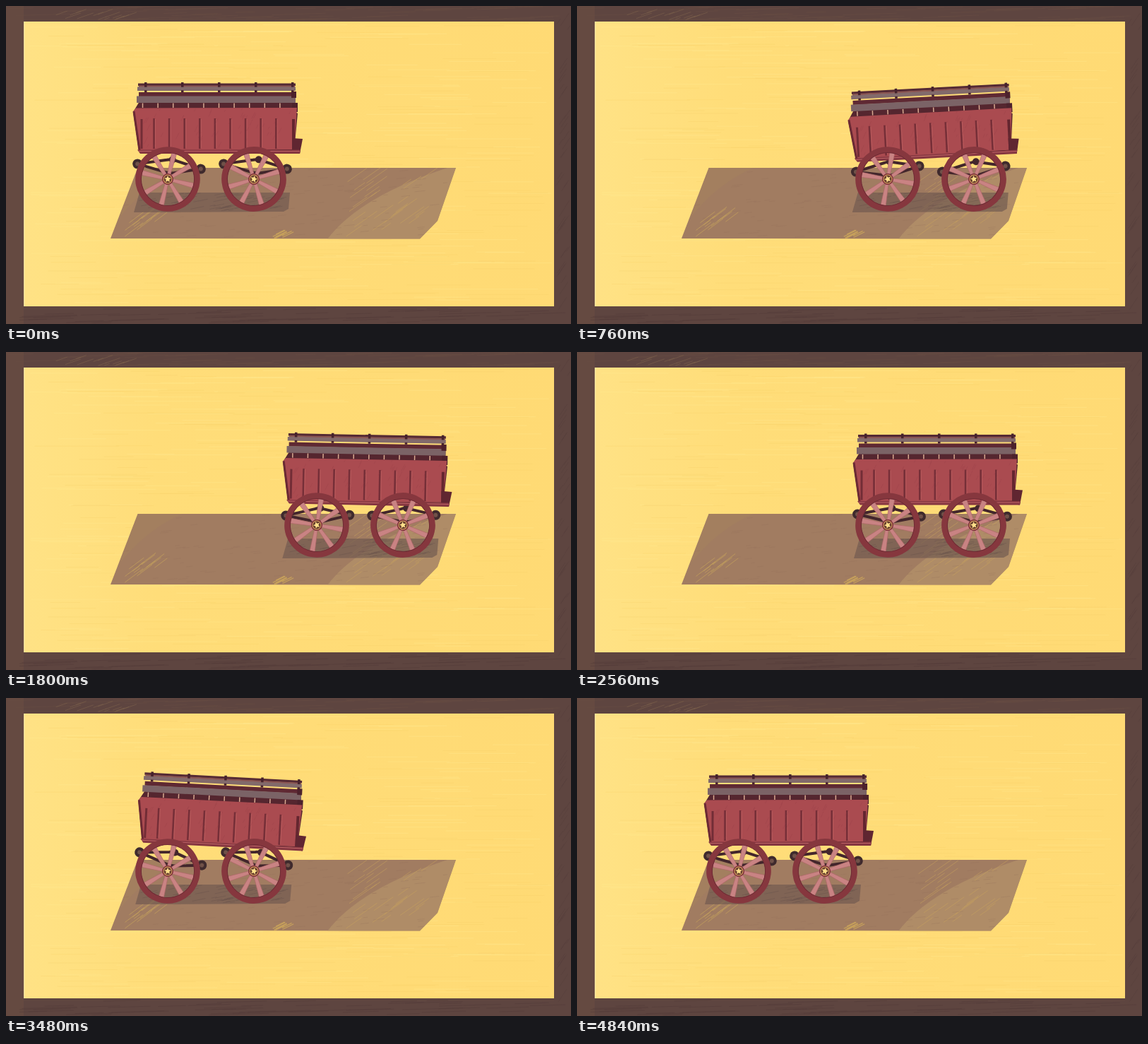
Recreate the animation shown at these times as an HTML page. Size 800 by 450 pixels, loop 4880 ms.

```html
<!DOCTYPE html>
<html lang="en">
<head>
<meta charset="utf-8">
<title>Wagon</title>
<style>
html, body { margin: 0; width: 100%; height: 100%; overflow: hidden; background: #5e4540; }
svg { display: block; width: 100vw; height: 100vh; }
</style>
</head>
<body>
<svg id="stage" viewBox="0 0 800 450" preserveAspectRatio="none">
  <defs>
    <linearGradient id="sun">
      <stop offset="0" stop-color="#ffe285"/>
      <stop offset=".25" stop-color="#ffdd79"/>
      <stop offset="1" stop-color="#ffda74"/>
    </linearGradient>
    <clipPath id="ground"><path d="M186.500 229H637L611 304L586 329.500L148 329Z"/></clipPath>
    <clipPath id="side"><path d="M182 146L412 144L408 202L188 204Z"/></clipPath>
  </defs>

  <rect width="800" height="450" fill="#5e4540"/>
  <rect width="25" height="450" fill="#654a41"/>
  <g id="grain"></g>
  <rect x="25.500" y="22" width="750.500" height="403" fill="url(#sun)"/>
  <path d="M26 22V425" stroke="#ffeaa0" stroke-width="1.5"/>
  <g id="streaks"></g>

  <g clip-path="url(#ground)">
    <rect x="140" y="220" width="510" height="120" fill="#a17c61"/>
    <path d="M455 330Q500 270 625 229H640V330Z" fill="#b7966a" opacity=".65"/>
    <path d="M187 229H250Q200 250 160 300Z" fill="#a88757" opacity=".25"/>
    <g id="scratch"></g>
  </g>

  <g id="shade">
    <path d="M189 264H402L400 287L393 291L181 292Z" fill="#6f5850" opacity=".66"/>
    <g id="hatch"></g>
  </g>

  <g id="springs"></g>

  <g id="body">
    <path d="M188 130H410V150L413 152L408 204H188L180 150L189 135Z" fill="#55262f"/>
    <rect x="187" y="109.500" width="223" height="3.500" fill="#552a34"/>
    <rect x="188" y="112.500" width="221" height="2.500" fill="#8a5553"/>
    <rect x="186" y="114.500" width="224" height="5.500" fill="#826a6b"/>
    <rect x="188" y="122" width="222" height="6" fill="#5f2933"/>
    <rect x="185" y="127.500" width="225" height="9.500" fill="#7b6366"/>
    <path d="M404 121H411V130H404ZM405 137H413V150H405Z" fill="#4c222c"/>
    <g id="fittings"></g>
    <path d="M180 149L184 144.500L412 144L411 159L408 203L188 205Z" fill="#aa4b50"/>
    <path d="M181 149L189 204" stroke="#6b2a34" stroke-width="3"/>
    <path d="M407 160V203" stroke="#64262f" stroke-width="4"/>
    <g id="planks"></g>
    <path d="M405 187L420 188L416 209L405 207Z" fill="#602631"/>
    <path d="M186 203.500H417L416 209H190Z" fill="#853640"/>
    <path d="M188 205.500H416" stroke="#bd6466" stroke-width="1"/>
  </g>

  <g id="wheels"></g>
</svg>
<script>
const LOOP = 4880, TRAVEL = 211, RUN = 640, STEP = 40;
const STOP_RIGHT = 668, STOP_LEFT = 3388;
const SWING = 1480, RADIUS = 45.5, HUBS = [229, 351], PHASES = [14, 28];
const $ = id => document.getElementById(id);
const clamp = v => Math.min(1, Math.max(0, v));

function add(parent, tag, attrs) {
  const el = document.createElementNS('http://www.w3.org/2000/svg', tag);
  for (const k in attrs) el.setAttribute(k, attrs[k]);
  parent.appendChild(el);
  return el;
}

let seed = 17;
function rnd(a, b) {
  seed = (seed * 16807) % 2147483647;
  return a + (b - a) * seed / 2147483647;
}

// Many short brush strokes gathered in one path
function strokes(parent, n, box, len, rise, color, width, opacity) {
  let d = '';
  for (let i = 0; i < n; i++) {
    const l = rnd(len * .3, len);
    const x = rnd(box[0], Math.max(box[0], box[2] - l)), y = rnd(box[1], box[3]);
    d += `M${x.toFixed(1)} ${y.toFixed(1)}l${l.toFixed(1)} ${(-l * rise).toFixed(1)}`;
  }
  return add(parent, 'path', { d, stroke: color, 'stroke-width': width, opacity, fill: 'none' });
}

function paint() {
  strokes($('streaks'), 170, [28, 24, 775, 423], 150, 0, '#ffe895', .8, .4);
  strokes($('streaks'), 150, [28, 24, 775, 423], 130, 0, '#f3c861', .8, .3);
  strokes($('grain'), 50, [0, 1, 800, 20], 90, .03, '#6b5044', 1, .4);
  strokes($('grain'), 50, [0, 428, 800, 449], 90, .03, '#533b39', 1, .5);
  strokes($('grain'), 14, [50, 10, 190, 20], 24, .35, '#81674f', 1, .5);
  strokes($('grain'), 40, [779, 22, 799, 430], 12, 1.5, '#543d3b', 1, .4);
  strokes($('scratch'), 120, [150, 231, 635, 327], 16, .1, '#8f6c59', 1, .25);
  strokes($('scratch'), 28, [480, 245, 625, 328], 40, .7, '#c9a45c', 1, .5);
  strokes($('scratch'), 12, [165, 300, 230, 329], 28, .75, '#cba85a', 1, .6);
  strokes($('scratch'), 8, [375, 322, 412, 329], 22, .5, '#d6b059', 1.2, .7);
  strokes($('hatch'), 60, [188, 266, 398, 290], 22, .2, '#5f4b47', 1, .3);

  const f = $('fittings'), p = $('planks');
  for (let i = 0; i < 5; i++)
    add(f, 'rect', { x: 196 + i * 52, y: 108, width: 3.5, height: 14, fill: '#46222c' });
  add(f, 'path', { d: 'M187 117H409', stroke: '#826a6b', 'stroke-width': 4.5 });
  for (let i = 0; i < 10; i++) {
    const x = 209.5 + i * 21.6;
    if (i < 9) {
      add(p, 'path', { d: `M${x} 159V202`, stroke: '#762f38', 'stroke-width': 2.6 });
      add(p, 'path', { d: `M${x + 2} 160V201`, stroke: '#bd6060', 'stroke-width': .8 });
    }
    add(f, 'path', { d: `M${x - 16} 137.500V144`, stroke: '#d9aa91', 'stroke-width': 1.5 });
  }
  add(p, 'path', { d: 'M192 160V202', stroke: '#722d36', 'stroke-width': 3 });
  const wear = strokes(p, 50, [184, 146, 408, 202], 5, 2, '#933d45', .8, .35);
  wear.setAttribute('clip-path', 'url(#side)');
}

function makeSpring() {
  const g = add($('springs'), 'g', {});
  add(g, 'path', {
    d: 'M-45 0L-4 -9Q2 -11 8 -9L45 0M-45 0L-2 9H6L45 0',
    fill: 'none', stroke: '#43262c', 'stroke-width': 4, 'stroke-linejoin': 'round'
  });
  add(g, 'circle', { cx: 4, cy: -10, r: 5, fill: '#43262c' });
  for (const x of [-45, 45]) {
    add(g, 'circle', { cx: x, r: 7, fill: '#3f2a2d' });
    add(g, 'circle', { cx: x, r: 3, fill: '#705148' });
  }
  return g;
}

function makeWheel() {
  const g = add($('wheels'), 'g', {});
  for (let i = 0; i < 8; i++)
    add(g, 'path', {
      d: 'M7 -2.200L38 -3.600V3.600L7 2.200Z', fill: '#c98383',
      stroke: '#ad6668', 'stroke-width': .6, transform: `rotate(${i * 45})`
    });
  add(g, 'circle', { r: 41.5, fill: 'none', stroke: '#86373e', 'stroke-width': 8.5 });
  add(g, 'circle', { r: 37.5, fill: 'none', stroke: '#6e2b34', 'stroke-width': 1 });
  add(g, 'circle', { r: 8, fill: '#7c3139' });
  add(g, 'circle', { r: 6, fill: '#69402f', stroke: '#dda765', 'stroke-width': 1 });
  let pts = '';
  for (let i = 0; i < 10; i++) {
    const a = i * Math.PI / 5 - Math.PI / 2 - .24, r = i % 2 ? 2.3 : 5;
    pts += `${(r * Math.cos(a)).toFixed(2)},${(r * Math.sin(a)).toFixed(2)} `;
  }
  add(g, 'polygon', { points: pts, fill: '#ffe08a' });
  return g;
}

paint();
const springs = HUBS.map(makeSpring), wheels = HUBS.map(makeWheel);

// Speed up, stop dead, then rock until settled
function pose(t) {
  const back = t >= STOP_LEFT - RUN;
  const tau = t - (back ? STOP_LEFT : STOP_RIGHT);
  const u = clamp(1 + tau / RUN);
  const go = u * u * (1.5 - .5 * u);
  const dir = back ? 1 : -1;
  let lean = u ** .9, rock = u * .878;
  if (tau > 0) {
    const fade = clamp((SWING - tau) / 400);
    lean = fade * Math.exp(-.0017 * tau) * Math.cos(2 * Math.PI * tau / 470);
    rock = fade * Math.exp(-.001 * tau) * Math.cos(2 * Math.PI * tau / 387 - .5);
  }
  // The ride height settles a little after the stop
  const settled = clamp((tau + RUN) / (RUN + 200));
  const side = back ? 1 - settled : settled;
  const swing = dir * 15 * rock;
  return {
    x: TRAVEL * (back ? 1 - go : go),
    drop: 7.5 * side,
    lean: dir * 10.5 * lean,
    tilt: 4.6 - 2.6 * side + swing,
    sway: swing * .3
  };
}

function draw(t) {
  const { x, drop, lean, tilt, sway } = pose(t);
  const put = (el, v) => el.setAttribute('transform', v);
  put($('body'), `translate(${x + sway} ${drop}) rotate(${lean} 290 245)`);
  put($('shade'), `translate(${x + sway} 0)`);
  HUBS.forEach((h, i) => {
    put(springs[i], `translate(${h + x + 2 + sway} ${227 + drop * .55}) rotate(${tilt})`);
    put(wheels[i], `translate(${h + x} 245) rotate(${PHASES[i] + x / RADIUS * 180 / Math.PI})`);
  });
}

const start = performance.now();
function tick(now) {
  const t = Math.max(0, now - start) % LOOP;
  draw(Math.floor(t / STEP) * STEP);
  requestAnimationFrame(tick);
}
draw(0);
requestAnimationFrame(tick);
</script>
</body>
</html>
```
